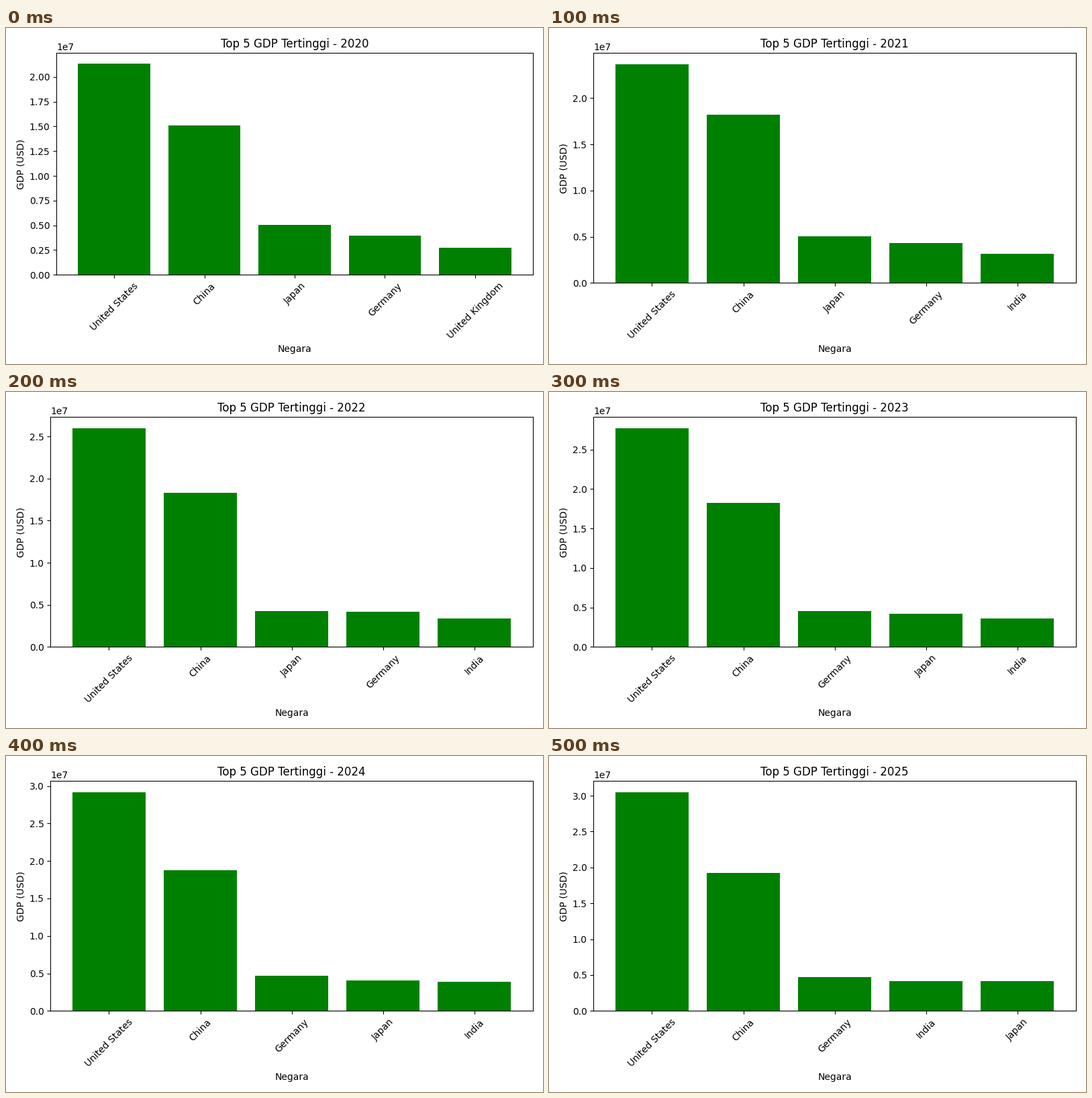
A matplotlib script that plays this animation: 800x500 px, repeating every 600 ms.

```python
import matplotlib.pyplot as plt
from matplotlib.animation import FuncAnimation

FIRST_YEAR = 2020
US, CN, JP, DE, IN, UK = ("United States", "China", "Japan",
                          "Germany", "India", "United Kingdom")

# Top five per year, in millions of USD
RANKINGS = [
    {US: 21354105, CN: 15103357, JP: 5054068, DE: 3936992, UK: 2696778},
    {US: 23681171, CN: 18190803, JP: 5039148, DE: 4351191, IN: 3167271},
    {US: 26006893, CN: 18307821, JP: 4262146, DE: 4166871, IN: 3346107},
    {US: 27720709, CN: 18270357, DE: 4527010, JP: 4213167, IN: 3638489},
    {US: 29184900, CN: 18748009, DE: 4658526, JP: 4026211, IN: 3909097},
    {US: 30507217, CN: 19231705, DE: 4744804, IN: 4187017, JP: 4186431},
]

fig = plt.figure(figsize=(8, 5), dpi=100)


def draw_year(index):
    """Rebuild the chart for one year, starting from the default margins."""
    fig.clear()
    fig.subplots_adjust(left=0.125, right=0.9, bottom=0.11, top=0.88)
    ax = fig.add_subplot()
    ranking = RANKINGS[index]
    ax.bar(list(ranking), list(ranking.values()), color="green")
    ax.set_title(f"Top 5 GDP Tertinggi - {FIRST_YEAR + index}")
    ax.set_xlabel("Negara")
    ax.set_ylabel("GDP (USD)")
    ax.tick_params(axis="x", rotation=45)
    fig.tight_layout()
    return []


anim = FuncAnimation(fig, draw_year, frames=len(RANKINGS), interval=100,
                     init_func=lambda: draw_year(0), repeat=True,
                     repeat_delay=0)
plt.show()
```
